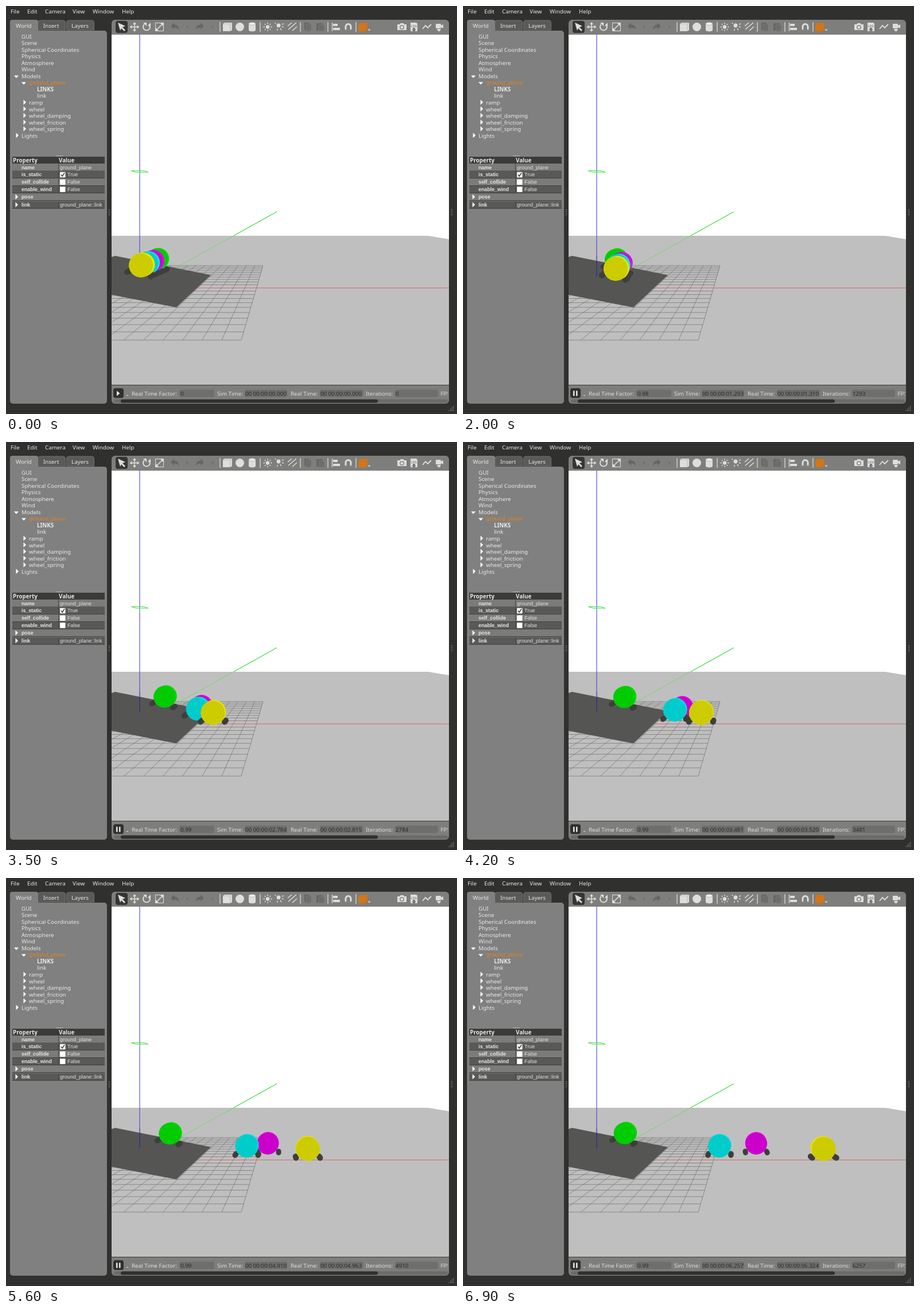
An HTML page for the animation above (7 s loop, 786 by 712 pixels).

```html
<!DOCTYPE html>
<html lang="en">
<head>
<meta charset="utf-8">
<title>Wheel joints</title>
<style>
html, body { margin: 0; width: 100%; height: 100%; overflow: hidden; background: #30302e; }
svg { display: block; width: 786px; height: 712px; }
text { font: 9.8px "Noto Sans", "Open Sans", sans-serif; fill: #e8e8e6; white-space: pre; }
.b { font-weight: bold; }
.cell { font: 9px "Liberation Sans", Arial, sans-serif; fill: #e0e0e0; }
.key { font: bold 8.8px "Liberation Sans", Arial, sans-serif; fill: #e6e6e6; }
.bar { fill: #dfdfdd; }
.num { fill: #2b2b2b; }
</style>
</head>
<body>
<svg id="stage" viewBox="0 0 786 712" xmlns="http://www.w3.org/2000/svg"></svg>
<script>
const stage = document.getElementById('stage');

const rect = (x, y, w, h, fill, r = 0, extra = '') =>
  `<rect x="${x}" y="${y}" width="${w}" height="${h}" rx="${r}" fill="${fill}" ${extra}/>`;
const path = (d, fill, stroke = 'none', width = 1, extra = '') =>
  `<path d="${d}" fill="${fill}" stroke="${stroke}" stroke-width="${width}" ${extra}/>`;
const line = (d, stroke, width = 1, extra = '') => path(d, 'none', stroke, width, extra);
const circle = (x, y, r, fill, extra = '') => `<circle cx="${x}" cy="${y}" r="${r}" fill="${fill}" ${extra}/>`;
const text = (x, y, s, cls = '', extra = '') => `<text x="${x}" y="${y}" class="${cls}" ${extra}>${s}</text>`;
const right = (x, y) => path(`M${x - 2} ${y - 4.5}l4.5 4.5l-4.5 4.5z`, '#fff');
const down = (x, y, s = 4, fill = '#fff') => path(`M${x - s} ${y - s / 2}h${2 * s}l${-s} ${s * 1.1}z`, fill);

function menu() {
  const items = [[8, 'File'], [37, 'Edit'], [68, 'Camera'], [116, 'View'], [151, 'Window'], [202, 'Help']];
  return items.map(([x, s]) => text(x, 12.5, s)).join('');
}

function tabs() {
  const tab = (x, w, s, tx) =>
    path(`M${x} 42V29q0-4 4-4h${w - 8}q4 0 4 4V42z`, '#5a5a58', '#6f6f6d') + text(tx, 37.5, s);
  return tab(55.5, 48, 'Insert', 65) + tab(105.5, 48, 'Layers', 114) +
    path('M7 48V28q0-4 4-4h41q4 0 4 4v20z', '#808080') + text(17, 37.5, 'World');
}

function tree() {
  const rows = [
    [27, 'GUI'], [27, 'Scene'], [27, 'Spherical Coordinates'], [27, 'Physics'], [27, 'Atmosphere'],
    [27, 'Wind'], [27, 'Models', 'v'], [40, 'ground_plane', 'v'], [54, 'LINKS'], [54, 'link'],
    [40, 'ramp', '>'], [40, 'wheel', '>'], [40, 'wheel_damping', '>'], [40, 'wheel_friction', '>'],
    [40, 'wheel_spring', '>'], [27, 'Lights', '>']
  ];
  return rows.map(([x, s, mark], i) => {
    const y = 53 + i * 11.55;
    const arrow = mark === 'v' ? down(x - 9, y + 1) : mark === '>' ? right(x - 7.5, y - .5) : '';
    const style = s === 'ground_plane' ? 'style="fill:#ec7f16"' : '';
    return arrow + text(x, y + 3.5, s, s === 'LINKS' ? 'b' : '', style);
  }).join('');
}

function table() {
  const rows = [
    ['name', 'ground_plane', 275.5, 0], ['is_static', 'True', 288.2, 1], ['self_collide', 'False', 301, 0],
    ['enable_wind', 'False', 313.8, 1], ['pose', '', 327, 0], ['link', 'ground_plane::link', 340.7, 1]
  ];
  let s = line('M87 261.5h12', '#b0b0b0') + rect(11, 263, 161, 12, '#3b3b39') +
    text(12, 272.5, 'Property', 'b') + text(92, 272.5, 'Value', 'b');
  rows.forEach(([key, value, y, dark], i) => {
    s += rect(11, y, 161, 12.5, dark ? '#595957' : '#7b7b7b') + line(`M11 ${y + 12.5}h161`, '#3e3e3c');
    s += text(27, y + 9, key, 'key');
    const boxed = i > 0 && i < 4;
    if (boxed) s += rect(94, y + 1.5, 9.5, 9.5, '#fff', 1);
    if (i === 1) s += line(`M96 ${y + 6}l2 3l4-6`, '#333', 1.4);
    if (i > 3) s += right(18.5, y + 6);
    s += text(boxed ? 107 : 94, y + 9, value, 'cell');
  });
  return s + line('M91.5 275v52M91.5 341v13', '#454543');
}

function toolbar() {
  const W = '#dededc', D = '#666664';
  const sep = x => line(`M${x} 28v17`, '#e2e2e0', 1.2);
  const curl = (x, dir) =>
    path(`M${x - 7 * dir} 35l${6 * dir}-6v3.5q${8 * dir} 0 ${8 * dir} 9q${-2 * dir}-4 ${-8 * dir}-4v3.5z`, D);
  let s = rect(191, 26, 21, 21, '#353533', 4) + path('M195 29l13 6l-5 2l5 5l-2 2l-5-5l-2 4z', W);
  s += line('M218 36.5h12M224 30.5v12', W, 1.6);
  s += path('M224 28l3 4h-6zM224 45l3-4h-6zM215.5 36.5l4-3v6zM232.5 36.5l-4-3v6z', W);
  s += line('M241 32a6 6 0 1 0 8 0', W, 2) + path('M239 29h6v6zM252 29v6h-5z', W);
  s += rect(260.5, 29.5, 14, 14, 'none', 0, `stroke="${W}"`) + line('M263 41l9-9', W, 1.6) +
    path('M274 30v5l-5-5zM261 43v-5l5 5z', W);
  s += curl(294, 1) + down(316, 36.5, 2.5, D) + curl(338, -1) + down(360, 36.5, 2.5, D);
  s += [373, 443, 513, 561, 610].map(sep).join('');
  s += path('M378 31l3-2h13v13l-3 2h-13z', W) + line('M378 31h13v13M391 31l3-2', '#b0b0ae', .8);
  s += circle(407.5, 36.5, 7.5, W) + path('M423 31v11a6 2.5 0 0 0 12 0v-11z', W) +
    '<ellipse cx="429" cy="31" rx="6" ry="2.5" fill="#eee" stroke="#aaa" stroke-width=".7"/>';
  const rays = (x, y, r, n) => Array.from({ length: n }, (_, i) => {
    const a = i * 2 * Math.PI / n, c = Math.cos(a), q = Math.sin(a);
    return `M${x + c * r} ${y + q * r}L${x + c * (r + 2.6)} ${y + q * (r + 2.6)}`;
  }).join('');
  s += circle(456, 36.5, 3.2, W) + line(rays(456, 36.5, 5, 8), W, 1.4);
  s += circle(475, 34, 3.4, W) + line('M481 32l3-1M481 36l3 1M478 39l2 3M473 40v3M470 31l-1-2', W, 1.4);
  s += line('M491 35l7-6M492 41l14-12M499 43l8-7', W, 1.5);
  s += rect(520, 29, 9, 13, D, 1) + rect(523, 31, 9, 13, '#6d6d6b', 1, 'stroke="#80807e" stroke-width=".7"');
  s += rect(541, 30, 11, 13, D, 1) + rect(545, 33, 10, 11, '#6d6d6b', 1, 'stroke="#80807e" stroke-width=".7"');
  s += line('M568.5 29v15', W, 1.3) + rect(570, 31, 8, 4, W) + rect(570, 38, 12, 4, W);
  s += line('M592 42v-6a4.5 4.5 0 0 1 9 0v6', W, 3) + line('M590 41h4M599 41h4', '#888', 1);
  s += path('M614.5 32l3-2.5h12v11.5l-3 3h-12z', '#d9750f') + line('M614.5 32h12v12M626.5 32l3-2.5', '#b8743a', .8) +
    down(633, 42, 2.5, '#dcdcda');
  s += path('M682 32h4l1.5-2h5l1.5 2h4v10h-16z', W) + circle(690, 37, 3.2, 'none', 'stroke="#777" stroke-width="1.3"');
  s += path('M705 29h10l2 2v13h-12z', W) + text(706, 36.5, 'LOG', '', 'style="font-size:5px;fill:#555"') +
    path('M709 38h4v3h2l-4 4l-4-4h2z', '#777');
  s += line('M726 40l5-6l4 4l6-6', W, 1.8);
  s += rect(749, 31, 9, 8, W, 1) + path('M758 34l4-2v7l-4-2zM751 40h7l-2 4h-3z', W);
  return s;
}

function scene() {
  const vx = 476, vy = 357;
  let grid = '';
  for (let i = 0; i <= 20; i++) {
    // depth lines meet at the vanishing point, cross lines have evenly spaced 1/y
    const bx = 410 - i * 34.1, k = 96 / 226;
    grid += `M${bx} 583L${vx + (bx - vx) * k} 453`;
    const q = 1 / (1 / 96 - i * .0002996), e = q / 226;
    if (i !== 10) grid += `M${vx + (410 - vx) * e} ${vy + q}L${vx + (-272 - vx) * e} ${vy + q}`;
  }
  return rect(184, 50, 588, 611, '#fff') +
    path('M184 401H736L772 407V661H184z', '#c0bfbf') +
    line(grid, '#6a6a6a', .65) +
    line('M330 492H772', '#d65c5c', .9) +
    line('M472 359L397 400.7', '#35dc35', 1.1) + line('M397 400.7L290 460.2', '#6cd86c', 1) +
    path('M184 438L190 436L357 469.5L297 526L184 504z', '#555554') +
    line('M233 50V436', '#4444dc', 1.1) + line('M233 436V472', '#28289c', 1.1) +
    path('M218 287.3H240L248 290H227z', 'none', '#3fdc3f', 1) +
    line('M233 288v10', '#7bdc8b', 1);
}

function footer() {
  let s = '';
  [[219, 'Real Time Factor:'], [368, 'Sim Time:'], [496, 'Real Time:'], [627, 'Iterations:']]
    .forEach(([x, t]) => { s += text(x, 679.5, t, 'bar'); });
  s += text(757.5, 679.5, 'FPS:', 'bar', 'clip-path="url(#cut)"');
  [[302, 61], [416, 74], [547, 75], [678, 75]].forEach(([x, w]) => { s += rect(x, 669.5, w, 13, '#6e6e6c', 3); });
  s += rect(187, 667, 18, 17, '#30302e', 4) + line('M210 679.5h3', '#ddd', 1.2);
  return s + rect(188, 686.5, 582, 6, '#6b6b69', 3) + rect(200, 686.5, 448, 6, '#2f2f2d', 3);
}

function grips() {
  let s = '';
  for (let i = 0; i < 4; i++) {
    s += [180, 777].map(x => rect(x - 1.5, 355 + i * 3, 3, 1, '#777775')).join('');
    for (let j = 0; j <= i; j++) s += rect(779 - j * 2.5, 698 + i * 2.5, 1.3, 1.3, '#8a8a88');
  }
  return s;
}

stage.innerHTML = `<defs>
  <clipPath id="view"><rect x="184" y="50" width="588" height="611"/></clipPath>
  <clipPath id="cut"><rect x="750" y="664" width="20" height="22"/></clipPath>
  <clipPath id="frame"><rect x="184" y="24" width="588" height="670" rx="6"/></clipPath></defs>` +
  rect(0, 0, 786, 712, '#30302e') + menu() +
  rect(7, 43, 169, 651, '#808080', 5) + tabs() + tree() + table() +
  '<g clip-path="url(#frame)">' + rect(184, 24, 588, 670, '#7e7e7c') + toolbar() + footer() +
  line('M184 661.5h588', '#3a3a38') + '</g>' +
  '<g clip-path="url(#view)">' + scene() + '<g id="wheels"></g></g>' + grips() +
  '<path id="button" fill="#e8e8e6"/>' +
  text(304, 679.5, '', 'num', 'id="rate"') + text(417, 679.5, '', 'num', 'id="sim"') +
  text(548, 679.5, '', 'num', 'id="real"') + text(679, 679.5, '', 'num', 'id="steps"');

// Keys: time in s, x, speed in px/s
const wheels = [
  { x0: 262.3, y0: 442.3, slope: .175, flat: 470, r: 18.8, face: '#00cc00', rim: '#00d600' },
  { x0: 254, y0: 445.8, slope: .184, flat: 463.5, r: 18.9, face: '#cc00cc', rim: '#e400ea',
    keys: [[.6, 254, 0], [2, 274, 30], [2.8, 303.5, 44], [3.6, 345, 57], [4.2, 381, 58], [5, 426.5, 54], [6.3, 487, 43], [6.9, 511, 38]] },
  { x0: 245, y0: 449, slope: .19, flat: 467.8, r: 20, face: '#00cccc', rim: '#00e4e4',
    keys: [[.6, 245, 0], [2, 269, 31], [2.8, 298, 40], [3.7, 345, 55], [4.2, 369, 44], [5, 401, 36], [6.3, 436, 21], [6.9, 447, 16]] },
  { x0: 235.2, y0: 452.5, slope: .192, flat: 472.5, r: 21, face: '#cccc00', rim: '#e6e600',
    keys: [[.6, 235.2, 0], [2, 266, 44], [2.8, 308.5, 66], [3.2, 337.3, 78], [4.2, 415, 78.5], [5, 478.5, 79], [6.3, 581.5, 79], [6.9, 628.7, 79]] }
];
const clock = [[.6, 0, 0], [.7, .007, .1], [2, 1.293, .991], [2.8, 2.086, .993], [4.2, 3.481, .993],
  [5, 4.272, .995], [6.3, 5.659, .997], [6.9, 6.257, .997]];

function hermite(keys, t) {
  if (t <= keys[0][0]) return keys[0][1];
  let i = 0;
  while (i < keys.length - 2 && t > keys[i + 1][0]) i++;
  const [t0, a, va] = keys[i], [t1, b, vb] = keys[i + 1];
  const h = t1 - t0, u = Math.min(1, (t - t0) / h), w = 1 - u;
  return a * w * w * (1 + 2 * u) + b * u * u * (3 - 2 * u) + h * u * w * (va * w - vb * u);
}

function drawWheel(w, t, sim) {
  const x = w.keys ? hermite(w.keys, t) : w.x0 + 11.5 * (1 - Math.cos(.635 * sim));
  const y = Math.min(w.flat, w.y0 + w.slope * (x - w.x0));
  const end = w.x0 + (w.flat - w.y0) / w.slope;
  const tilt = .19 * Math.max(0, Math.min(1, (end + 8 - x) / 16));
  const c = Math.cos(tilt), s = Math.sin(tilt), k = w.r / 20.2;
  const dx = (490 - x) / 75;
  const caster = side => {
    const px = side * 20 * k, py = 14.7;
    const cx = x + dx / 3 + px * c - py * s, cy = y + px * s + py * c;
    const d = Math.max(-4, Math.min(4, (475 - cx) / 45));
    return line(`M${cx - d / 2} ${cy + 1.2}L${cx + d / 2} ${cy - 1.2}`, '#3e3e3d', 9.6 * k, 'stroke-linecap="round"');
  };
  return caster(-1) + caster(1) +
    line(`M${x} ${y}L${x + dx} ${y - 1.3}`, w.rim, 2 * w.r, 'stroke-linecap="round"') +
    circle(x, y, w.r, w.face);
}

const el = id => document.getElementById(id);
const stamp = s => '00 00:00:' + s.toFixed(3).padStart(6, '0');

function draw(ms) {
  const t = Math.floor(ms / 100) / 10, on = t >= .6;
  const sim = hermite(clock, t), real = sim * 1.01 + (sim > 0 ? .004 : 0);
  el('wheels').innerHTML = wheels.map(w => drawWheel(w, t, sim)).join('');
  el('button').setAttribute('d', on ? 'M192 671.5h2.5v9h-2.5zM197 671.5h2.5v9h-2.5z' : 'M193 671.5l5.5 4.5l-5.5 4.5z');
  el('rate').textContent = sim <= 0 ? '0' : sim < 1.6 ? '0.98' : '0.99';
  el('sim').textContent = stamp(sim);
  el('real').textContent = stamp(real);
  el('steps').textContent = Math.round(sim * 1000);
}

const start = performance.now();
function tick() {
  draw((performance.now() - start) % 7000);
  requestAnimationFrame(tick);
}
draw(0);
requestAnimationFrame(tick);
</script>
</body>
</html>
```
